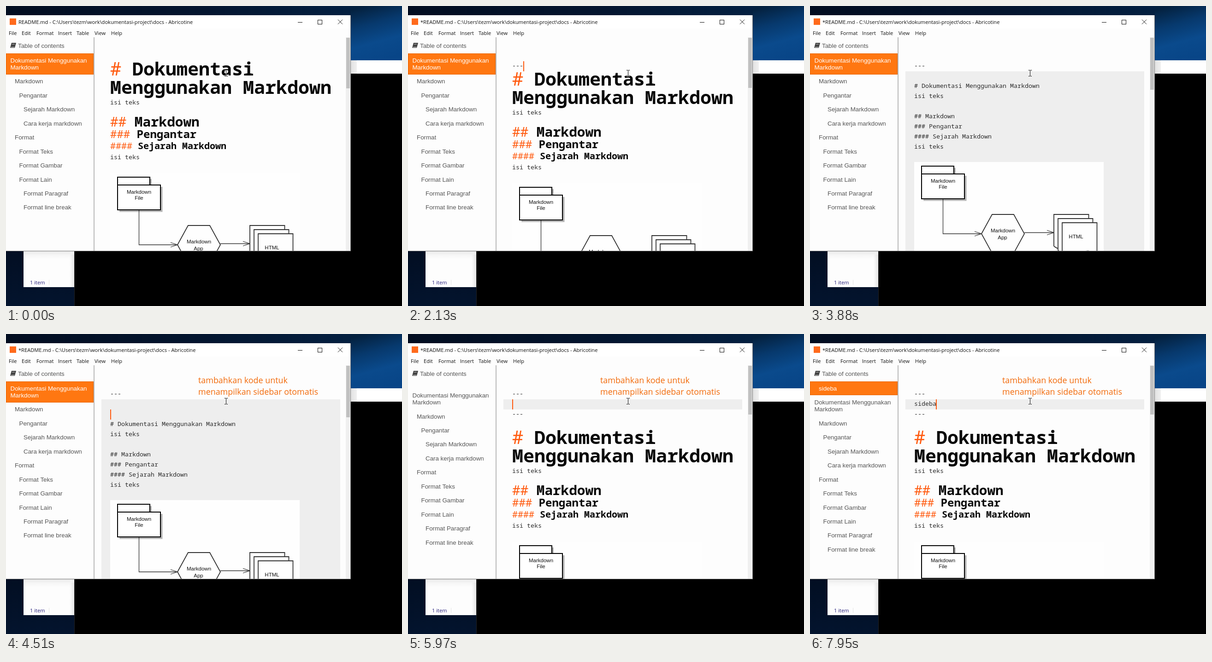
Animation, 859 px wide and 652 px high, one loop 8000 ms. Source, as an HTML page with a canvas:

```html
<!DOCTYPE html>
<html lang="id">
<head>
<meta charset="utf-8">
<title>Markdown editor</title>
<style>
  html, body { margin: 0; width: 100%; height: 100%; overflow: hidden; background: #000; }
  canvas { display: block; }
</style>
</head>
<body>
<canvas id="stage" width="859" height="652"></canvas>
<script>
const ctx = document.getElementById('stage').getContext('2d');
const LOOP = 8000, ORANGE = '#ff5a0f', LINE = 22, CARET_STEP = 7.9, LEFT = 226, TOP = 120;
const UI = '"Open Sans", sans-serif';
const ARIAL = '"Liberation Sans", Arial, sans-serif';
const MONO = '"Noto Sans Mono", monospace';

// [time, lines typed above the document, caret [row, column], view, scroll thumb end]
// rich: headings styled; open / closed: front matter block shown as plain text
const steps = [
  [0, [], null, 'rich', 179],
  [200, [''], [1, 0], 'rich', 178],
  [630, [''], null, 'rich', 178],
  [940, [''], [0, 0], 'rich', 178],
  [1700, [''], null, 'rich', 178],
  [1740, ['-'], [0, 1], 'rich', 178],
  [1890, ['--'], [0, 2], 'rich', 178],
  [2130, ['---'], [0, 3], 'rich', 178],
  [2520, ['---'], [0, 3], 'open', 183],
  [2560, ['---', ''], [1, 0], 'open', 182],
  [2990, ['---', ''], null, 'open', 182],
  [3450, ['---', ''], [1, 0], 'open', 182],
  [3880, ['---', ''], null, 'open', 182],
  [4310, ['---', ''], [1, 0], 'open', 182],
  [4510, ['---', '', ''], [2, 0], 'open', 181],
  [4710, ['---', '', '-'], [2, 1], 'open', 181],
  [4880, ['---', '', '--'], [2, 2], 'open', 181],
  [5160, ['---', '', '---'], [2, 3], 'closed', 181],
  [5400, ['---', '', '---', ''], [3, 0], 'closed', 179],
  [5860, ['---', '', '---', ''], [2, 0], 'rich', 175],
  [5970, ['---', '', '---', ''], [1, 0], 'rich', 175],
  [6400, ['---', '', '---', ''], null, 'rich', 175],
  [6600, ['---', 's', '---', ''], [1, 1], 'rich', 175],
  [7010, ['---', 's', '---', ''], null, 'rich', 175],
  [7120, ['---', 'si', '---', ''], [1, 2], 'rich', 175],
  [7510, ['---', 'sid', '---', ''], [1, 3], 'rich', 175],
  [7710, ['---', 'side', '---', ''], [1, 4], 'rich', 175],
  [7860, ['---', 'sideb', '---', ''], [1, 5], 'rich', 175],
  [7950, ['---', 'sideba', '---', ''], [1, 6], 'rich', 175],
];
const NOTE_AT = 4350;

const contents = [
  [1, 'Dokumentasi Menggunakan', 'Markdown'], [2, 'Markdown'], [3, 'Pengantar'],
  [4, 'Sejarah Markdown'], [4, 'Cara kerja markdown'], [2, 'Format'], [3, 'Format Teks'],
  [3, 'Format Gambar'], [3, 'Format Lain'], [4, 'Format Paragraf'], [4, 'Format line break'],
];
const plainLines = ['# Dokumentasi Menggunakan Markdown', 'isi teks', '', '## Markdown',
  '### Pengantar', '#### Sejarah Markdown', 'isi teks'];
// [marker, text, font size, baseline below the top of the document]
const richLines = [
  ['#', 'Dokumentasi', 40, 31], ['', 'Menggunakan Markdown', 40, 71], ['##', 'Markdown', 29.33, 142],
  ['###', 'Pengantar', 24, 167], ['####', 'Sejarah Markdown', 20, 191],
];

function rect(x, y, w, h, color) {
  ctx.fillStyle = color;
  ctx.fillRect(x, y, w, h);
}
function text(value, x, y, font, color, align = 'left') {
  ctx.font = font;
  ctx.fillStyle = color;
  ctx.textAlign = align;
  ctx.fillText(value, x, y);
}
function path(points, stroke, width = 1, fill, close) {
  ctx.beginPath();
  points.forEach(([x, y]) => ctx.lineTo(x, y));
  if (close) ctx.closePath();
  if (fill) { ctx.fillStyle = fill; ctx.fill(); }
  if (stroke) { ctx.strokeStyle = stroke; ctx.lineWidth = width; ctx.stroke(); }
}
function gradient(x0, y0, x1, y1, ...colors) {
  const g = ctx.createLinearGradient(x0, y0, x1, y1);
  colors.forEach((c, i) => g.addColorStop(i / (colors.length - 1), c));
  return g;
}

function drawDesktop() {
  rect(0, 0, 859, 652, '#000');
  rect(0, 0, 859, 20, gradient(0, 0, 859, 0, '#020d20', '#03152f', '#042447'));
  rect(748, 0, 111, 118, gradient(780, 0, 812, 118, '#04213f', '#07396d', '#0a4a8c', '#084587'));
  rect(748, 118, 111, 29, '#fff');
  rect(748, 118, 13, 29, gradient(748, 0, 761, 0, '#e2e2e2', '#f0f0f0'));
  rect(0, 532, 148, 120, gradient(0, 532, 0, 652, '#020e22', '#03142e'));
  rect(38, 532, 110, 79, gradient(0, 532, 0, 550, '#e6e6e6', '#f6f6f6', '#fdfdfd'));
  rect(138, 540, 10, 71, gradient(138, 0, 148, 0, 'rgba(225,225,225,0)', '#e6e6e6'));
  rect(93, 595, 1, 11, '#e4e4e4');
  rect(148, 533, 1, 119, '#222');
  text('1 item', 52, 605, `11.1px ${UI}`, '#27207c');
}

function drawChrome(dirty) {
  rect(0, 20, 748, 513, '#777');
  rect(0, 20, 747, 512, '#fdfdfd');
  rect(0, 20, 747, 29, '#fff');
  rect(8, 27, 14, 14, '#ff6a1c');
  const title = 'README.md - C:\\Users\\tezm\\work\\dokumentasi-project\\docs - Abricotine';
  text((dirty ? '*' : '') + title, 27, 39, `11.1px ${UI}`, '#111');
  rect(633, 35, 10, 1, '#111');
  ctx.strokeStyle = '#111';
  ctx.lineWidth = 1;
  ctx.strokeRect(676.5, 30.5, 9, 9);
  path([[720, 29.5], [730, 39.5]], '#111');
  path([[730, 29.5], [720, 39.5]], '#111');
  const menu = { File: 6, Edit: 34, Format: 66, Insert: 113, Table: 153, View: 192, Help: 228 };
  for (const name in menu) text(name, menu[name], 63, `11.1px ${UI}`, '#111');
}

function drawSidebar(lines) {
  const font = `13.33px ${ARIAL}`, row = 15.23;
  path([[12, 80], [22, 80], [19, 91], [9, 91]], null, 1, '#444', true);
  path([[13, 83], [19, 83]], '#ccc');
  path([[10.5, 89.5], [18.5, 89.5]], '#ddd');
  text('Table of contents', 26, 91, font, '#555');
  rect(190, 68, 2, 464, '#b9b9b9');

  // A second "---" turns the line above it into a heading.
  const items = lines[2] ? [[2, lines[1]], ...contents] : contents;
  let y = 103;
  items.forEach(([level, ...labels], i) => {
    const rows = labels[0] ? labels.length : 0;
    const active = i === 0 && rows > 0;
    if (active) {
      const height = Math.round(row * (rows + 1));
      rect(0, y, 190, height, '#e9680c');
      rect(1, y + 1, 188, height - 2, '#ff7711');
    }
    labels.forEach((label, n) =>
      text(label, 9.5 * level, Math.round(y + 19.6 + n * row), font, active ? '#fff' : '#555'));
    y += row * (rows + 1);
  });
}

function drawPage(x, y) {
  ctx.beginPath();
  ctx.moveTo(x, y + 69);
  ctx.lineTo(x, y);
  ctx.lineTo(x + 75.5, y);
  ctx.lineTo(x + 75.5, y + 69);
  ctx.bezierCurveTo(x + 62, y + 60, x + 50, y + 58, x + 38, y + 69);
  ctx.bezierCurveTo(x + 26, y + 80, x + 12, y + 78, x, y + 69);
  ctx.fillStyle = '#fefefe';
  ctx.fill();
  ctx.strokeStyle = '#333';
  ctx.lineWidth = 1.8;
  ctx.stroke();
}

function drawDiagram(top) {
  const label = (value, x, y) => text(value, x, y, `11.5px ${ARIAL}`, '#111', 'center');
  const arrow = (points) => {
    const [x, y] = points[points.length - 1];
    path(points, '#333', 1.3);
    path([[x - 15, y - 5], [x, y], [x - 15, y + 5]], '#333', 1.3);
  };
  ctx.save();
  ctx.translate(0, top);
  rect(LEFT, -9, 411, 300, '#fefefe');
  rect(246, 4, 70, 17, '#b4b4b4');
  rect(246, 21, 93.5, 54.5, '#b4b4b4');
  for (const [width, y, height] of [[70, 0, 17], [93, 17, 54]]) {
    rect(242, y, width, height, '#fff');
    ctx.strokeStyle = '#000';
    ctx.lineWidth = 2;
    ctx.strokeRect(242, y, width, height);
  }
  label('Markdown', 288.5, 36);
  label('File', 288.5, 49);
  arrow([[288.5, 72], [288.5, 147], [372, 147]]);
  path([[372, 147], [395, 105], [442, 105], [465, 147], [442, 189], [395, 189]], '#333', 1.8, '#fefefe', true);
  label('Markdown', 418.5, 144);
  label('App', 417.5, 159);
  arrow([[465, 144.5], [529, 144.5]]);
  path([[557.5, 198], [557.5, 260]], '#333', 1.3);
  for (let i = 0; i < 3; i++) drawPage(529 + 9 * i, 105 + 9 * i);
  label('HTML', 577, 157);
  ctx.restore();
}

function drawEditor([, lines, caret, view, thumbEnd]) {
  const docTop = TOP + LINE * lines.length;
  const plain = (value, top) => text(value, LEFT, top + 14, `13.33px ${MONO}`, '#2b2b2b');
  const shade = (from, to) => rect(207, from, 518, to - from, '#eee');
  ctx.save();
  ctx.beginPath();
  ctx.rect(192, 68, 555, 464);
  ctx.clip();

  if (view === 'open') shade(TOP + LINE, 532);
  else if (lines.length > 2) shade(TOP + LINE, TOP + 2 * LINE);
  if (view === 'closed') shade(docTop + LINE, 532);

  lines.forEach((line, i) => plain(line, TOP + LINE * i));
  if (view === 'rich') {
    drawDiagram(docTop + 252);
    for (const [marker, words, size, dy] of richLines) {
      const indent = marker ? (marker.length + 1) * size * 0.6 : 0;
      text(marker, LEFT, docTop + dy, `${size}px ${MONO}`, ORANGE);
      text(words, LEFT + indent, docTop + dy, `bold ${size}px ${MONO}`, '#080808');
    }
    plain('isi teks', docTop + 80);
    plain('isi teks', docTop + 199);
  } else {
    drawDiagram(docTop + 184);
    plainLines.forEach((line, i) => plain(line, docTop + LINE * i));
  }

  if (caret) {
    const [row, column] = caret;
    const height = view === 'rich' && row === lines.length ? 46 : LINE;
    rect(LEFT + Math.round(CARET_STEP * column), TOP + LINE * row, 2, height, ORANGE);
  }
  rect(737, 68, 10, 464, '#f0f0f0');
  rect(738, 69, 8, thumbEnd - 69, '#c1c1c1');
  ctx.restore();
}

function drawPointer() {
  ctx.globalCompositeOperation = 'difference';
  rect(477, 140, 1, 12, '#fff');
  for (const y of [139, 152]) {
    rect(474, y, 3, 1, '#fff');
    rect(478, y, 3, 1, '#fff');
  }
  ctx.globalCompositeOperation = 'source-over';
}

function draw(now) {
  const time = now % LOOP;
  const state = steps.filter(([start]) => start <= time).pop();
  drawDesktop();
  drawChrome(state[1].length > 0);
  drawSidebar(state[1]);
  drawEditor(state);
  if (time >= NOTE_AT) {
    text('tambahkan kode untuk', 417, 107, `17.9px ${UI}`, '#f26a0a');
    text('menampilkan sidebar otomatis', 417, 132, `17.9px ${UI}`, '#f26a0a');
  }
  drawPointer();
}

let start;
function tick(now) {
  start ??= now;
  draw(now - start);
  requestAnimationFrame(tick);
}
requestAnimationFrame(tick);
</script>
</body>
</html>
```
